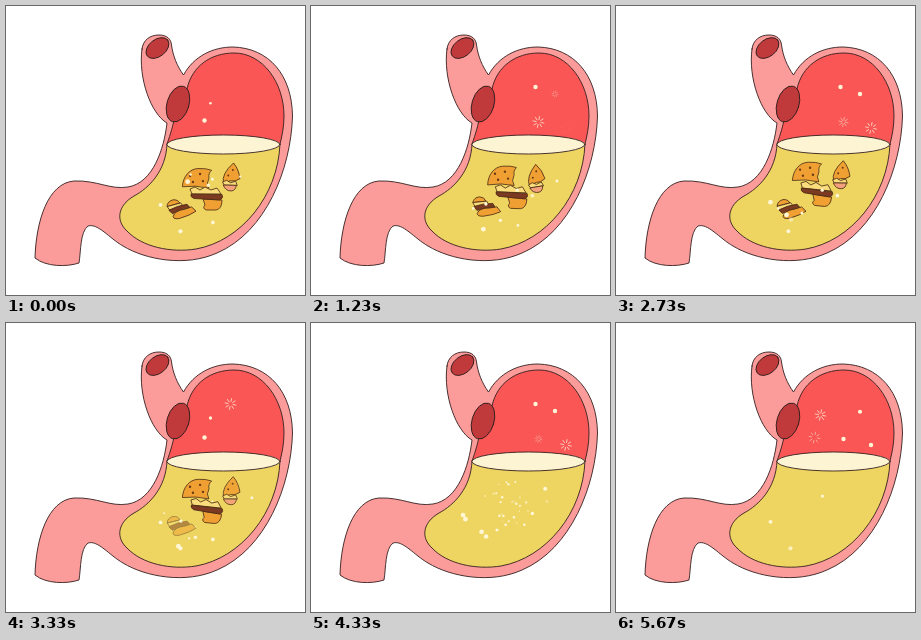
An HTML page for the animation above (5.71 s loop, 299x289 px).

```html
<!DOCTYPE html>
<html lang="en">
<head>
<meta charset="utf-8">
<title>Digestion</title>
<style>
  html, body { margin: 0; width: 100%; height: 100%; overflow: hidden; background: #fff; }
  svg { display: block; width: 299px; height: 289px; }
  .line { stroke: #352020; stroke-width: .9; stroke-linejoin: round; stroke-linecap: round; }
  .food { stroke: #4a2c14; stroke-width: .8; stroke-linejoin: round; }
  .bun { fill: #f0a033; }
  .cream { fill: #f9dc7c; }
  .patty { fill: #7d3a22; }
  .ham { fill: #f3a07c; }
  .seed { fill: #6b3b14; stroke: none; }
  .bubble { fill: #fff6d6; }
  .burst { stroke: #ffd9c4; stroke-width: .9; stroke-linecap: round; fill: none; }
</style>
</head>
<body>
<svg viewBox="0 0 299 289">
  <path class="line" fill="#fb9c9a" d="M136 43C137 34 144 29 153 29C161 29 165 33 165.500 39C167 50 171 60 177.500 69
    C188 50 207 41 227 41C263 42 286 69 286.500 110C285 163 260 226 211 247C180 261 140 254 117 240
    C103 232 92 217 82 220C74 226 75 245 73 257C61 261 40 261 29 252C30 215 42 177 68 175
    C91 174 104 184 122 181C147 177 158 143 161 117C145 108 132 72 136 43Z"/>
  <path class="line" fill="#f95655" d="M161 138C165 127 167 119 168 114L181 83C186 60 205 47 228 47
    C257 47 278 77 278 110C278 121 276 130 274 138Z"/>
  <path class="line" fill="#eed561" d="M161 138C160 165 143 182 128 190C111 200 110 215 121 225
    C136 241 165 247 190 243C235 235 272 190 274 138Z"/>
  <ellipse class="line" cx="217.5" cy="138.5" rx="56.5" ry="9.5" fill="#fdf4d3"/>
  <ellipse class="line" cx="151.5" cy="42" rx="13" ry="8.5" fill="#c03a3c" transform="rotate(-38 151.5 42)"/>
  <ellipse class="line" cx="172" cy="98" rx="11" ry="18.5" fill="#c03a3c" transform="rotate(17 172 98)"/>

  <g class="food" id="top">
    <path class="bun" d="M176.500 181C177 171 183 163 192 162.500Q200 162 205.500 164Q202 167 203 172Q200 177 203 182Q190 179 176.500 181Z"/>
    <g class="seed">
      <circle cx="184" cy="170" r="1.2"/><circle cx="194" cy="168" r="1.2"/>
      <circle cx="187" cy="176" r="1.2"/><circle cx="197" cy="175" r="1.2"/>
    </g>
  </g>
  <g class="food" id="base">
    <path class="bun" d="M197 193L216 194Q216 203 210 204H200Q196 202 199 199Z"/>
    <path class="cream" d="M184 183L189 181L194 184L199 181L205 184L211 182L215 188L186 188Z"/>
    <path class="patty" d="M185 188L216 188.500Q218 192 214 194L188 192.500Q184 191 185 188Z"/>
  </g>
  <g class="food" id="side">
    <path class="bun" d="M226 157Q232 163 234 172Q229 176 225 175L218 178Q215 169 226 157Z"/>
    <path class="cream" d="M217 177L221 175L225 177L230 175L232 179L219 180Z"/>
    <path class="ham" d="M218 180L231 179Q231 184 227 185Q221 186 218 180Z"/>
    <circle class="seed" cx="222" cy="170" r="1"/><circle class="seed" cx="226" cy="164" r="1"/>
  </g>
  <g class="food" id="small">
    <g transform="rotate(-6 175 204)">
      <path class="bun" d="M166 209Q169 203 178 204L186 203L189.500 208Q183 211 172 212Q166 212 166 209Z"/>
      <path class="bun" d="M162 198Q163 193 169 192.500Q174 193 175 197Z"/>
      <path class="cream" d="M162 198L176 197L178 201L164 202Z"/>
      <path class="patty" d="M163 202Q172 199 182 199.500L184 203Q174 203 166 206Z"/>
    </g>
  </g>
  <g id="fx"></g>
</svg>
<script>
const LOOP = 5710, GAS_CYCLE = 1650, LIQUID_CYCLE = 1850;
const GAS_LIFE = 600, BURST = 440, LIQUID_LIFE = 750, LAST_BIRTH = 5250, FADE = 400;
const TAU = Math.PI * 2;
const $ = id => document.getElementById(id);
const clamp = v => Math.max(0, Math.min(1, v));
const easeOut = v => 1 - (1 - clamp(v)) ** 3;
const wave = (t, period, peak = 0) => Math.cos((t - peak) / period * TAU);

let seed = 7;
const rand = () => (seed = seed * 16807 % 2147483647) / 2147483647;
const spread = (count, make) => Array.from({ length: count }, (_, i) => make(i));

function add(tag, name) {
  const el = document.createElementNS("http://www.w3.org/2000/svg", tag);
  el.setAttribute("class", name);
  return $("fx").appendChild(el);
}
const dot = () => add("circle", "bubble");
function place(el, x, y, r, opacity) {
  el.setAttribute("cx", x);
  el.setAttribute("cy", y);
  el.setAttribute("r", r);
  el.setAttribute("opacity", opacity);
}

// Where the gas bubbles burst, in order of appearance
const gas = [[198.5, 114.5], [204.5, 92], [255, 122], [227.5, 116], [244, 88], [224.5, 81]]
  .map(([x, y], i) => ({ x, y, r: 2.2, start: i * 212 - 220, el: dot(), rays: add("path", "burst") }));

// Bubbles scattered over a slanted oval inside the liquid
const LIQUID_COUNT = 20;
const liquid = spread(LIQUID_COUNT, i => {
  const angle = rand() * TAU, reach = Math.sqrt(rand());
  const u = Math.cos(angle) * reach, v = Math.sin(angle) * reach;
  return {
    x: 196 + 52 * u, y: 192 - 18 * u + 34 * v, r: 1.1 + 1.4 * rand(),
    start: i / LIQUID_COUNT * LIQUID_CYCLE - LIQUID_LIFE, el: dot()
  };
});

// Pivot, fade start, dust count and how each piece drifts and turns
const rise = t => 3.2 * (wave(t, 6000) - 1);
const pieces = [
  { id: "top", x: 191, y: 172, fade: 3750, dust: 12, lift: rise, turn: t => wave(t, 3000) },
  { id: "base", x: 201, y: 191, fade: 3750, dust: 12, lift: t => rise(t) * .7, turn: t => 3 - 3 * wave(t, 6000) },
  { id: "side", x: 225, y: 172, fade: 3290, dust: 10, lift: t => 2.5 * wave(t, 5000, 1000) - 1, turn: t => 6 * wave(t, 3000) },
  { id: "small", x: 175, y: 204, fade: 3130, dust: 14, lift: t => wave(t, 3000) - 1, turn: t => -5 * wave(t, 3000) }
];

const dust = pieces.flatMap(p => spread(p.dust, () => ({
  x: p.x + (rand() * 2 - 1) * 17, y: p.y + (rand() * 2 - 1) * 13,
  r: .6 + rand() * .7, start: p.fade + 80 + rand() * 350, life: 350 + rand() * 500, el: dot()
})));

const ageAt = (b, t, cycle) => t < b.start ? -1 : (t - b.start) % cycle;
function drawBubble(b, age, opacity) {
  const grow = easeOut(age / 190);
  place(b.el, b.x, b.y + 6 * (1 - grow), b.r * (.5 + .5 * grow), opacity);
}

function drawGas(b, t) {
  const age = ageAt(b, t, GAS_CYCLE);
  drawBubble(b, age, age >= 0 && age < GAS_LIFE ? 1 : 0);

  const k = (age - GAS_LIFE) / BURST;
  const outer = 3 + 2.5 * easeOut(k * 2), inner = 1.5 + 2 * k;
  const rays = spread(8, i => {
    const c = Math.cos(i / 8 * TAU + .2), s = Math.sin(i / 8 * TAU + .2);
    return `M${b.x + c * inner} ${b.y + s * inner}L${b.x + c * outer} ${b.y + s * outer}`;
  });
  b.rays.setAttribute("d", rays.join(""));
  b.rays.setAttribute("opacity", k < 0 ? 0 : Math.min(.4 + 2 * k, clamp(3 * (1 - k))));
}

function drawLiquid(b, t) {
  const age = ageAt(b, t, LIQUID_CYCLE);
  const on = age >= 0 && t - age < LAST_BIRTH;
  drawBubble(b, age, on ? clamp((LIQUID_LIFE - age) / 80) : 0);
}

function drawPiece(p, t) {
  const el = $(p.id);
  el.setAttribute("transform", `translate(0 ${p.lift(t)}) rotate(${p.turn(t)} ${p.x} ${p.y})`);
  el.setAttribute("opacity", 1 - clamp((t - p.fade) / FADE));
}

function drawDust(d, t) {
  const k = (t - d.start) / d.life;
  place(d.el, d.x, d.y - k * 5, d.r, k > 0 ? clamp((1 - k) * 4) : 0);
}

const begin = performance.now();
function draw(now) {
  const t = Math.max(0, now - begin) % LOOP;
  pieces.forEach(p => drawPiece(p, t));
  gas.forEach(b => drawGas(b, t));
  liquid.forEach(b => drawLiquid(b, t));
  dust.forEach(d => drawDust(d, t));
  requestAnimationFrame(draw);
}
draw(begin);
</script>
</body>
</html>
```
